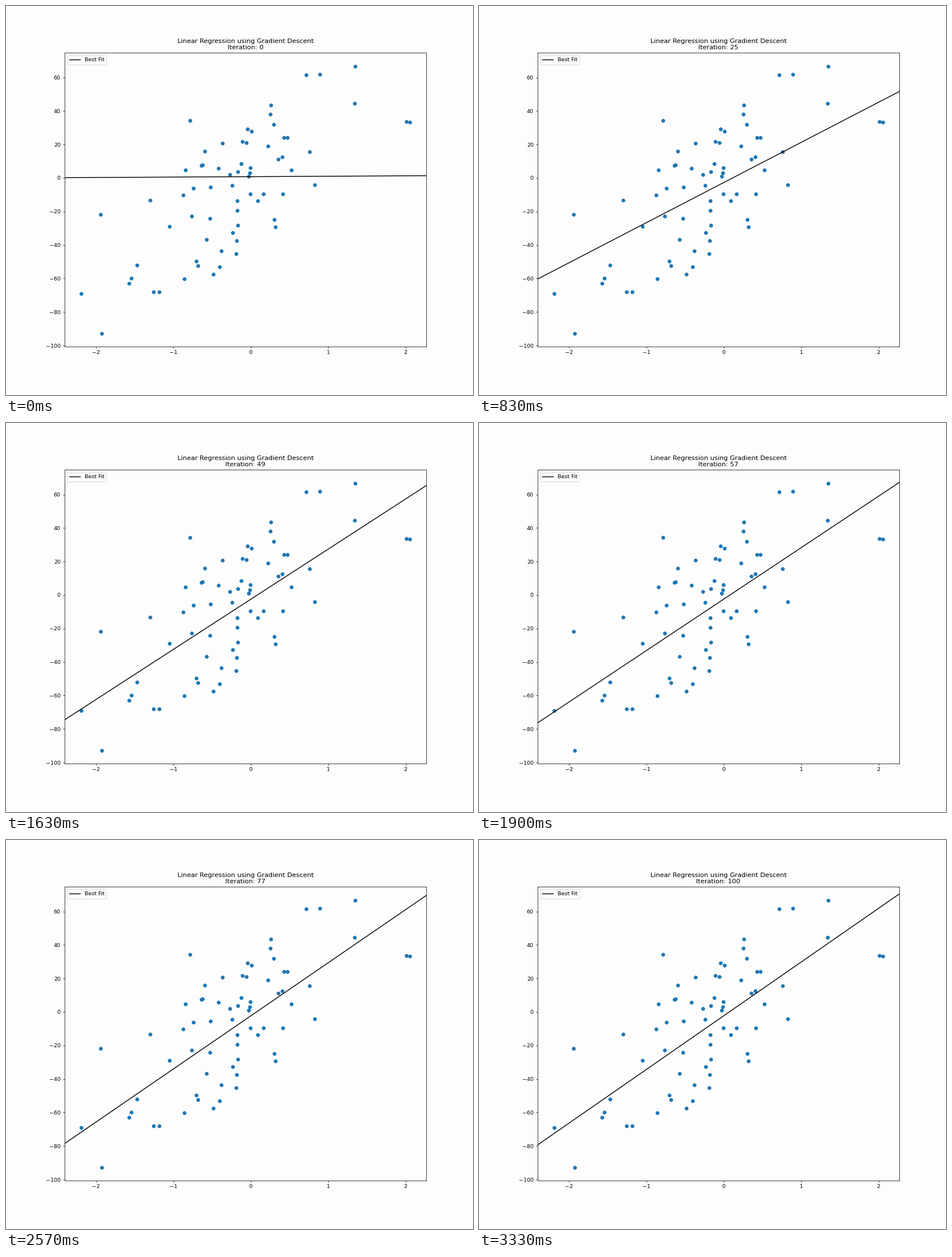
A matplotlib script for the animation above (3360 ms loop, 820x683 px).

```python
import numpy as np
import matplotlib.pyplot as plt
from matplotlib.animation import FuncAnimation

WIDTH, HEIGHT, DPI = 820, 683, 68.25
LOOP_MS, TICK_MS = 3360, 20
ITERATIONS = 100
PAPER = "#fdfdfd"
X_LIM = np.array([-2.405, 2.268])
Y_LIM = (-100.55, 74.84)

# Regression problem: (intercept, slope) pairs and the moments of x
START = np.array([0.8, 0.25])
BEST = np.array([-2.25, 32.25])
MEAN_X, MEAN_X2 = -0.08, 0.7516
RATE = 0.07

# Points on the rim of the cloud; the core is random
RIM = np.array([
    (-2.19, -69.0), (-1.92, -92.7), (-1.94, -21.6),
    (-0.78, 34.5), (0.72, 61.6), (1.35, 66.8),
    (1.34, 44.6), (2.01, 33.8), (2.055, 33.2),
])
CORE_COUNT = 60
SPREAD = 40


def make_cloud():
    rng = np.random.default_rng(7)
    x = rng.triangular(-1.7, 0, 1.0, CORE_COUNT)
    y = BEST[0] + BEST[1] * x + rng.uniform(-SPREAD, SPREAD, CORE_COUNT)
    return np.vstack([RIM, np.column_stack([x, y])])


def descend():
    """Return (intercept, slope) after each gradient step."""
    curvature = np.array([[1, MEAN_X], [MEAN_X, MEAN_X2]])
    path = [START]
    for _ in range(ITERATIONS):
        path.append(path[-1] - RATE * curvature @ (path[-1] - BEST))
    return path


path = descend()

fig = plt.figure(figsize=(WIDTH / DPI, HEIGHT / DPI), dpi=DPI, facecolor=PAPER)
ax = fig.add_axes([0.125, 0.125, 0.775, 0.755], facecolor=PAPER)
ax.scatter(*make_cloud().T)
line, = ax.plot([], [], color="black", label="Best Fit")
ax.set_xlim(X_LIM)
ax.set_ylim(Y_LIM)
ax.legend(loc="upper left")
title = ax.set_title("")


def draw(tick):
    # Thirty steps a second, rounded to hundredths, read at mid-tick
    now = (tick + 0.5) * TICK_MS
    step = min(int((now + 5) * 30 / 1000), ITERATIONS)
    intercept, slope = path[step]
    line.set_data(X_LIM, intercept + slope * X_LIM)
    title.set_text(f"Linear Regression using Gradient Descent\nIteration: {step}")
    return line, title


anim = FuncAnimation(fig, draw, frames=LOOP_MS // TICK_MS, interval=TICK_MS,
                     repeat=True, repeat_delay=0)
plt.show()
```
